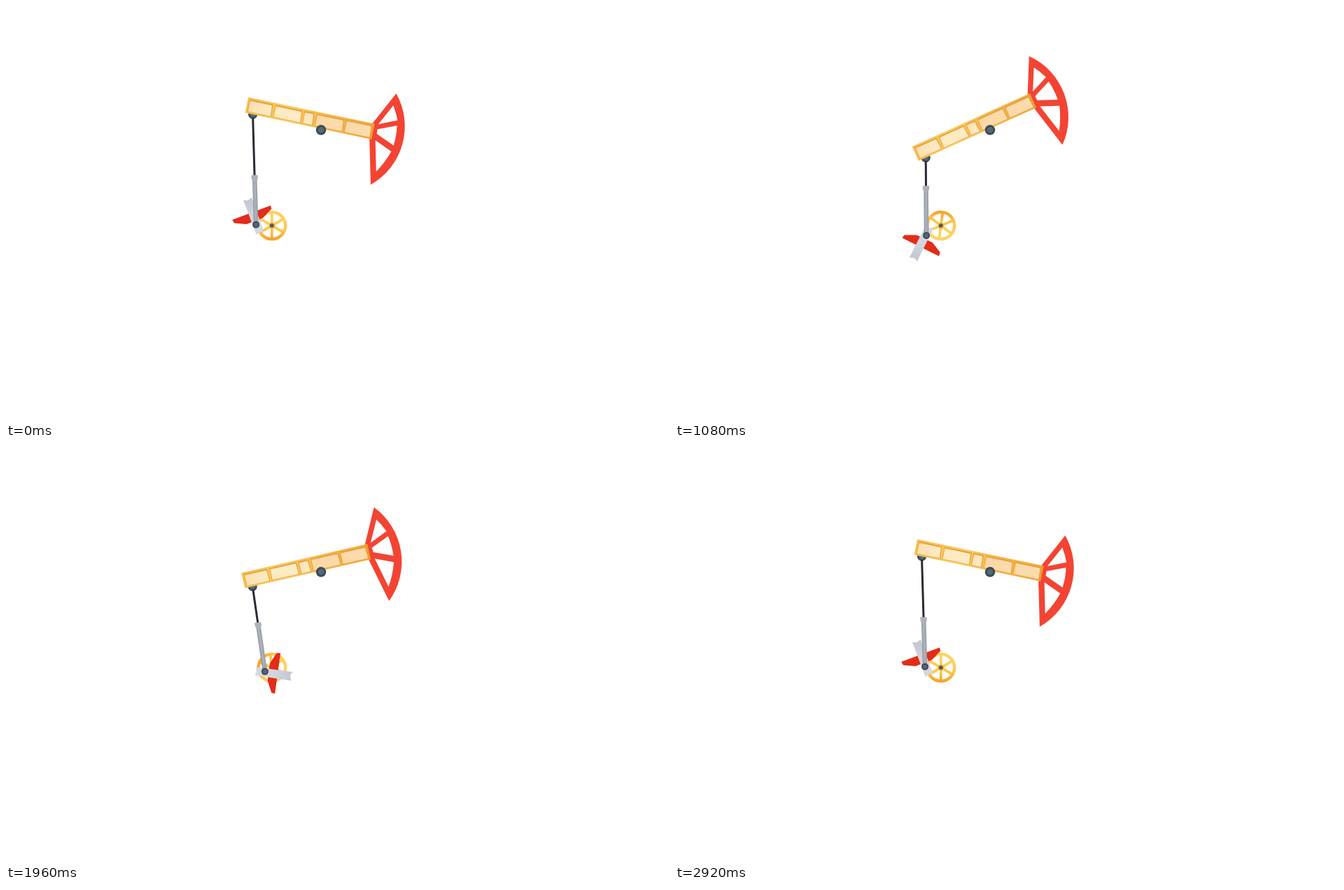
Recreate the animation shown at these times as an HTML page with a canvas. Size 947 px wide and 592 px high, loop 2960 ms.

```html
<!DOCTYPE html>
<html lang="en">
<head>
<meta charset="utf-8">
<title>Pump jack</title>
<style>
html, body { margin: 0; width: 100%; height: 100%; overflow: hidden; background: #fff; }
canvas { display: block; }
</style>
</head>
<body>
<canvas id="stage" width="947" height="592"></canvas>
<script>
const ctx = document.getElementById('stage').getContext('2d');
const RAD = Math.PI / 180;
const LOOP = 2960, STEP = 40, TURN = 2920, PEAK = 1270;
const PIVOT = [450, 177.3], CRANK = [361.4, 320], WHEEL = [379.8, 314];
const BEAM_PIN = [-100, -1.7], CRANK_PIN = [8.3, -1.6];

// Place a local point after rotating it about an origin
function place([ox, oy], deg, [x, y]) {
  const c = Math.cos(deg * RAD), s = Math.sin(deg * RAD);
  return [ox + x * c - y * s, oy + x * s + y * c];
}

function within([x, y], deg, draw) {
  ctx.save();
  ctx.translate(x, y);
  ctx.rotate(deg * RAD);
  draw();
  ctx.restore();
}

function disc(x, y, r, fill) {
  ctx.fillStyle = fill;
  ctx.beginPath();
  ctx.arc(x, y, r, 0, 7);
  ctx.fill();
}

function bolt(x, y, r) {
  disc(x, y, r, '#3b4a55');
  disc(x, y, r * 0.6, '#566874');
}

function poly(points, fill) {
  ctx.fillStyle = fill;
  ctx.beginPath();
  points.forEach(p => ctx.lineTo(...p));
  ctx.closePath();
  ctx.fill();
}

function blend(x0, y0, x1, y1, ...colors) {
  const g = ctx.createLinearGradient(x0, y0, x1, y1);
  colors.forEach((c, i) => g.addColorStop(i / (colors.length - 1), c));
  return g;
}

const horsehead = new Path2D(
  'M69.7 -24L94.3 -73.3A96 96 0 0 1 85.5 62L70 -3Z' +
  'M78.4 -25L93.8 -55.5Q100 -46 104 -36Z' +
  'M78.5 -17.5L104.8 -28.6Q107.3 -15 106 .3L79 -11Z' +
  'M79 -1.5L104.5 9.4Q99 27 89.3 42Z');

function drawBeam() {
  ctx.fillStyle = '#f34433';
  ctx.fill(horsehead, 'evenodd');
  bolt(...BEAM_PIN, 6.6);
  ctx.fillStyle = blend(-111, 0, 73, 0, '#f9bf4f', '#fcca5e', '#f7b646', '#f2a63a');
  ctx.fillRect(-111.2, -24.3, 184.4, 22.6);
  const cells = [[-108.5, -74.5], [-71, -31.5], [-28.5, -14], [-10.5, 29.5], [32.5, 70]];
  const fills = ['#fbdfae', '#fdeabf', '#fce2b0', '#fbd7a4', '#fad8a8'];
  cells.forEach(([a, b], i) => {
    poly([[a, -21.8], [b, -21.8], [b + 1, -3.8], [a, -3.8]], '#e4a340');
    poly([[a + 1, -19.8], [b - 1.2, -19.8], [b - 0.2, -4.4], [a + 1, -4.4]],
      blend(a, -20, b, -5, fills[i], i < 3 ? '#fdebc6' : '#fbdcae'));
  });
  ctx.fillStyle = '#ee9a2b';
  ctx.fillRect(71, -24.3, 2.2, 22.6);
}

function drawWheel() {
  ctx.strokeStyle = blend(0, -21, 0, 21, '#fcd466', '#fcd05c', '#fbc64d', '#f5a02a');
  ctx.lineWidth = 4.4;
  ctx.beginPath();
  ctx.arc(0, 0, 19.3, 0, 7);
  ctx.stroke();
  ctx.lineWidth = 3.8;
  ctx.beginPath();
  for (let a = 30; a < 390; a += 60) {
    ctx.moveTo(0, 0);
    ctx.lineTo(...place([0, 0], a, [19, 0]));
  }
  ctx.stroke();
  disc(0, 0, 4.6, '#f6b73f');
  bolt(0, 0, 2.8);
}

function drawCrank() {
  poly([[27, 27.5], [22, 27], [14, 11], [13.5, -14], [21, -30], [26.5, -31]], '#e32c1a');
  poly([[-5.5, -6], [47.5, -6.6], [45.2, -2], [45.6, 2], [47.5, 5.8], [-5.2, 5.8], [-3.6, 0]],
    blend(-5, 0, 47, 0, '#d5d7e2', '#d3d5e0', '#c3c6d2'));
}

function drawRod(from, to) {
  const dx = from[0] - to[0], dy = from[1] - to[1];
  const len = Math.hypot(dx, dy);
  within(to, Math.atan2(dx, -dy) / RAD, () => {
    ctx.fillStyle = '#2a2a33';
    ctx.fillRect(-1.5, -len + 5, 3, len - 70);
    ctx.fillStyle = blend(-3.3, 0, 3.3, 0, '#959aa2', '#b0b4bc', '#959aa2');
    ctx.fillRect(-3.3, -66, 6.6, 66);
    poly([[-4.6, -71], [4.6, -71], [4.6, -66], [3.3, -63], [-3.3, -63], [-4.6, -66]], '#adb1bb');
  });
  bolt(...to, 5);
}

function frame(now) {
  const t = Math.floor(now % LOOP / STEP) * STEP;
  const up = t < PEAK ? t / PEAK : (TURN - t) / (TURN - PEAK);
  const tilt = 11.9 - 42.6 * up;
  const spin = 250 - 360 * t / TURN;

  ctx.clearRect(0, 0, 947, 592);
  within(WHEEL, -1440 * t / TURN, drawWheel);
  within(CRANK, spin, drawCrank);
  within(PIVOT, tilt, drawBeam);
  bolt(...PIVOT, 7.2);
  drawRod(place(PIVOT, tilt, BEAM_PIN), place(CRANK, spin, CRANK_PIN));
  requestAnimationFrame(frame);
}
requestAnimationFrame(frame);
</script>
</body>
</html>
```
